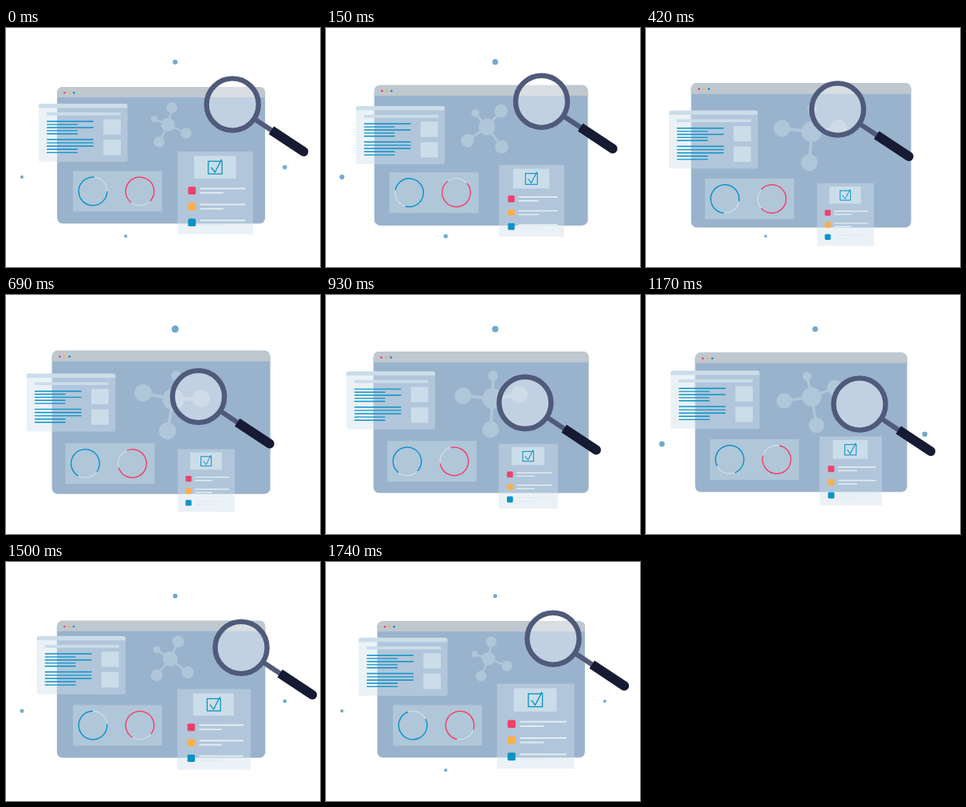
Animation, 394 px wide and 300 px high, one loop 1.77 s. Source, as an HTML page with a canvas:

```html
<!DOCTYPE html>
<html lang="en">
<head>
<meta charset="utf-8">
<title>Search dashboard</title>
<style>
html, body { margin: 0; width: 100%; height: 100%; overflow: hidden; background: #fff; }
canvas { display: block; width: 394px; height: 300px; }
</style>
</head>
<body>
<canvas id="stage"></canvas>
<script>
const W = 394, H = 300, LOOP = 1770, STEP = 30;
const RED = '#ee416c', AMBER = '#f8b04c', BLUE = '#0b92c7';
const PALE = '#cbdde9', MIST = '#b0c6d9', STEEL = '#505a7a', INK = '#161a33';
const GLASS = 'rgba(207,225,235,.42)';
const cv = document.getElementById('stage'), g = cv.getContext('2d');
const dpr = window.devicePixelRatio || 1;
cv.width = W * dpr;
cv.height = H * dpr;

const KEYS = [0, 150, 420, 690, 1170, 1500, 1740];

// Smooth cyclic curve through the values; span is the gain per loop.
function track(vals, span = 0, times = KEYS) {
  const n = vals.length;
  const at = i => {
    const lap = Math.floor(i / n), k = i - lap * n;
    return [times[k] + lap * LOOP, vals[k] + lap * span];
  };
  const rate = (i, j) => {
    const [t0, v0] = at(i), [t1, v1] = at(j);
    return (v1 - v0) / (t1 - t0);
  };
  const slope = i => {
    const a = rate(i - 1, i), b = rate(i, i + 1), m = rate(i - 1, i + 1);
    if (a * b <= 0) return m;
    return Math.sign(m) * Math.min(Math.abs(m), 3 * Math.abs(a), 3 * Math.abs(b));
  };
  return t => {
    let i = n - 1;
    while (times[i] > t) i--;
    const [t0, v0] = at(i), [t1, v1] = at(i + 1);
    const h = t1 - t0, u = (t - t0) / h, r = 1 - u;
    return v0 * (1 + 2 * u) * r * r + v1 * u * u * (3 - 2 * u)
      + h * u * r * (slope(i) * r - slope(i + 1) * u);
  };
}

const winW = track([261, 268, 276, 274, 266, 261.5, 260.5]);
const docKeys = [0, 150, 420, 690, 900, 1170, 1500, 1740];
const docX = track([41, 37.5, 28.7, 25.8, 25, 31, 38.6, 41], 0, docKeys);
const docY = track([95, 98, 103.5, 98.4, 96, 95, 93, 95], 0, docKeys);
const panX = track([84, 79.5, 74, 74.5, 80, 84, 84]);
const panY = track([179.5, 181.2, 189, 186, 181, 179.5, 179.5]);
const spin = track([-42, 148, 412, 437, 470, 672, 1012], 1080);
const netX = track([203.2, 202, 208, 210, 208, 206, 204]);
const netY = track([121.3, 124.3, 130, 131, 128, 121.5, 121.3]);
const netS = track([1, 1.23, 1.55, 1.6, 1.43, 1.1, .98]);
const netR = track([0, 28, 69, 75, 55, 12, -4]);
const cardX = track([262.7, 258, 250.3, 251.3, 256.8, 261, 263]);
const cardY = track([207, 217, 234.2, 232.8, 220.7, 210.2, 206.2]);
const cardW = track([94.5, 82, 71.5, 71.5, 78.5, 92, 97]);
const magKeys = [0, 150, 420, 690, 1080, 1170, 1500, 1740];
const magX = track([284.2, 270.5, 240.5, 241.5, 258, 268, 295, 285], 0, magKeys);
const magY = track([96, 92.3, 102, 127.5, 138, 137, 107.5, 96.3], 0, magKeys);

// x, y, then time/radius pairs joined by straight ramps
const DOTS = [
  [212.3, 42.7, 0, 3, 150, 3.6, 330, 5, 390, 0, 540, 0, 570, 5, 690, 4.5, 1170, 3.5, 1500, 2.9, 1740, 2.5, 1770, 3],
  [20, 187, 0, 2, 150, 3, 330, 4, 390, 0, 1080, 0, 1110, 4, 1170, 3.5, 1500, 2.4, 1740, 2, 1770, 2],
  [349.8, 174.7, 0, 2.7, 90, 3.2, 150, 0, 1020, 0, 1050, 3.7, 1170, 3.2, 1500, 2.3, 1740, 2, 1770, 2.7],
  [150.2, 261.3, 0, 2, 150, 2.6, 420, 1.8, 600, 0, 1530, 0, 1740, 2, 1770, 2]
];

function fillBox(x, y, w, h, color, r = 0) {
  g.fillStyle = color;
  g.beginPath();
  g.roundRect(x, y, w, h, r);
  g.fill();
}
function disc(x, y, r, color) {
  g.fillStyle = color;
  g.beginPath();
  g.arc(x, y, r, 0, 2 * Math.PI);
  g.fill();
}
function line(pts, color, width, cap = 'butt') {
  g.strokeStyle = color;
  g.lineWidth = width;
  g.lineCap = cap;
  g.beginPath();
  pts.forEach(p => g.lineTo(p[0], p[1]));
  g.stroke();
}
function ring(x, y, r, color, width, from = 0, to = 2 * Math.PI) {
  g.strokeStyle = color;
  g.lineWidth = width;
  g.lineCap = 'butt';
  g.beginPath();
  g.arc(x, y, r, from, to);
  g.stroke();
}
function group(x, y, s, draw) {
  g.save();
  g.translate(x, y);
  g.scale(s, s);
  draw();
  g.restore();
}

function dots(t) {
  for (const [x, y, ...k] of DOTS) {
    let i = 0;
    while (k[i + 2] <= t) i += 2;
    const r = k[i + 1] + (k[i + 3] - k[i + 1]) * (t - k[i]) / (k[i + 2] - k[i]);
    if (r > .1) disc(x, y, r, '#70a9cf');
  }
}

function browser() {
  fillBox(-130.5, -85.8, 261, 171.6, '#9ab3cd', 7);
  fillBox(-130.5, -85.8, 261, 13, '#bfc8cf', [7, 7, 0, 0]);
  [RED, AMBER, BLUE].forEach((c, i) => disc(-121 + i * 5.8, -78.6, 1.3, c));
}

function network(turn) {
  g.rotate(turn * Math.PI / 180);
  const nodes = [[-77, 21.8, 6.8], [202, 18.6, 4], [117, 24.3, 6.8], [25.5, 25.2, 6.8]];
  disc(0, 0, 8.5, MIST);
  for (const [deg, d, r] of nodes) {
    const a = deg * Math.PI / 180, x = d * Math.cos(a), y = d * Math.sin(a);
    line([[0, 0], [x, y]], MIST, 2.4);
    disc(x, y, r, MIST);
  }
}

function doc() {
  fillBox(0, 5.5, 111.5, 67.5, GLASS, [0, 0, 2, 2]);
  fillBox(0, 0, 111.5, 5.5, PALE, [3, 3, 0, 0]);
  fillBox(10, 11, 93, 3.7, PALE);
  fillBox(81.2, 19.5, 21.8, 19.3, PALE);
  fillBox(81.2, 45.2, 21.8, 19.3, PALE);
  [59, 39, 59, 39, 39].forEach((w, i) => fillBox(10, 21.6 + i * 3.85, w, 1.4, BLUE, .7));
  [59, 59, 59, 39, 39].forEach((w, i) => fillBox(10, 44.3 + i * 4.1, w, 1.4, BLUE, .7));
}

function charts(deg) {
  fillBox(0, 0, 112, 51, MIST);
  [[25, BLUE, 0], [84, RED, 128]].forEach(([x, color, lead]) => {
    const mid = (deg + lead) * Math.PI / 180, gap = .73;
    ring(x, 25.5, 17.8, PALE, 1.4);
    ring(x, 25.5, 17.8, color, 1.5, mid + gap, mid + 2 * Math.PI - gap);
  });
}

function card() {
  g.translate(-47.25, -52);
  fillBox(0, 0, 94.5, 104, GLASS);
  fillBox(20.5, 5.5, 52.5, 28.5, PALE);
  g.strokeStyle = BLUE;
  g.lineWidth = 1.3;
  g.strokeRect(38.4, 12.3, 17.2, 15.8);
  line([[42, 20], [46.8, 26], [55, 10]], BLUE, 1.3);
  [RED, AMBER, BLUE].forEach((c, i) => {
    const y = 44.3 + i * 20;
    fillBox(13, y, 9.7, 9.7, c, 1.8);
    fillBox(28, y + 1.2, 57.3, 1.9, '#e1edf4', .9);
    fillBox(28, y + 6.6, 29.5, 1.9, '#e1edf4', .9);
  });
}

function magnifier() {
  disc(0, 0, 31, 'rgba(255,255,255,.39)');
  ring(0, 0, 32.6, STEEL, 6.4);
  g.rotate(Math.atan2(59, 89));
  line([[34, 0], [60, 0]], STEEL, 6.2);
  fillBox(58.5, -5.9, 54.5, 11.8, INK, [.5, 5.9, 5.9, .5]);
}

function paint(t) {
  g.setTransform(dpr, 0, 0, dpr, 0, 0);
  g.fillStyle = '#fff';
  g.fillRect(0, 0, W, H);
  dots(t);
  group(194.6, 159.8, winW(t) / 261, browser);
  group(netX(t), netY(t), netS(t), () => network(netR(t)));
  group(docX(t), docY(t), 1, doc);
  group(panX(t), panY(t), 1, () => charts(spin(t)));
  group(cardX(t), cardY(t), cardW(t) / 94.5, card);
  group(magX(t), magY(t), 1, magnifier);
}

let start;
function tick(now) {
  if (start === undefined) start = now;
  const t = (now - start) % LOOP;
  paint(Math.floor(t / STEP) * STEP);
  requestAnimationFrame(tick);
}
paint(0);
requestAnimationFrame(tick);
</script>
</body>
</html>
```
